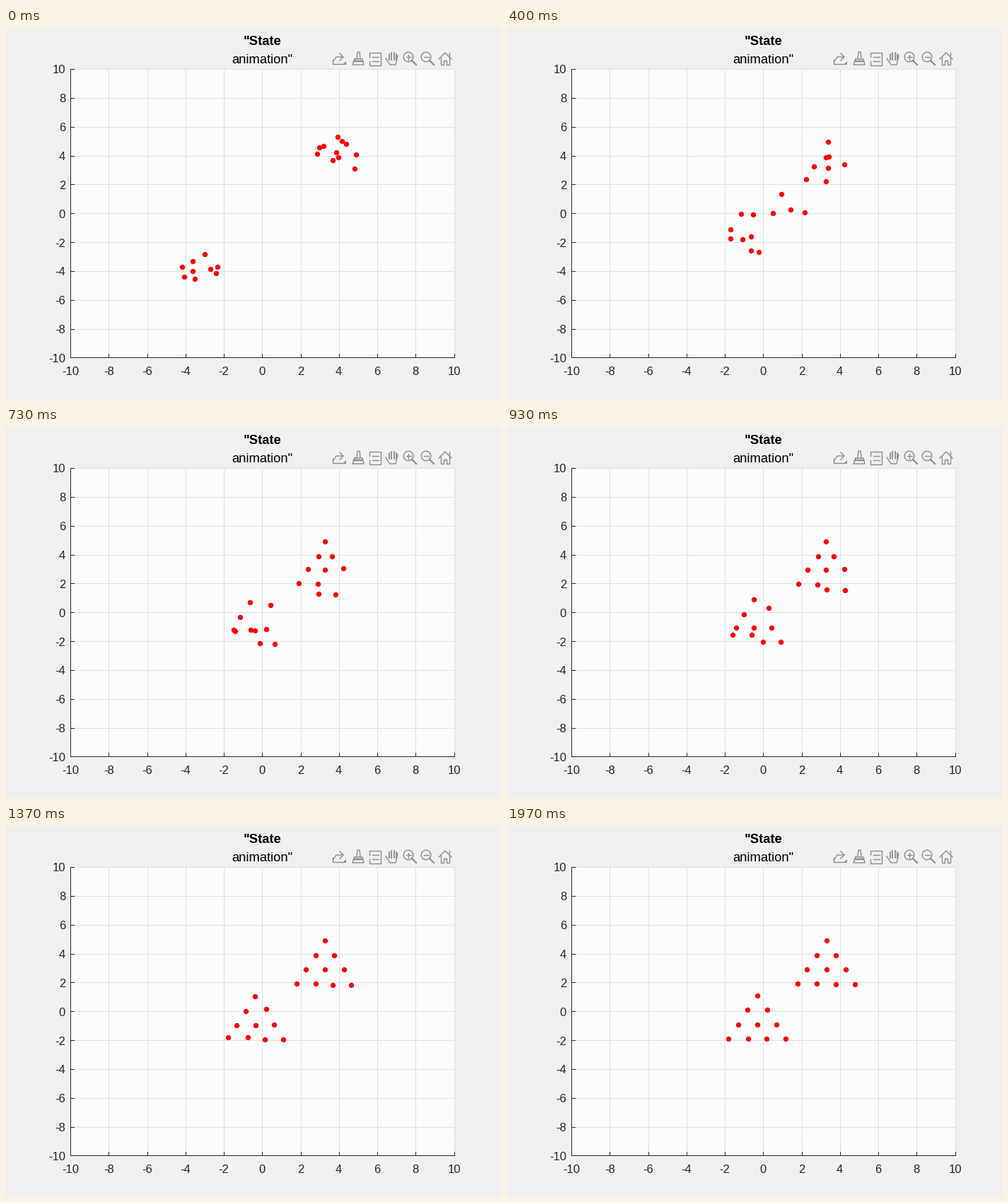
Write a matplotlib script that moves like this. It is 700 px wide and 525 px high and loops after 2.01 s.

```python
import numpy as np
import matplotlib.pyplot as plt
from matplotlib.animation import FuncAnimation
from matplotlib.patches import Circle, Polygon, Rectangle

W, H, DPI = 700, 525, 100
PX = 72 / DPI
BACK, PLOT, INK = "#f0f0f0", "#fcfcfd", "#262626"
GRID, ICON, RED = "#e0e0e0", "#8c8c8c", "#fa0000"
LEFT, RIGHT, TOP, BOTTOM = 91, 633.5, 58, 466.4

plt.rcParams["font.family"] = "Liberation Sans"
fig = plt.figure(figsize=(W / DPI, H / DPI), dpi=DPI, facecolor=BACK)
ax = fig.add_axes([0, 0, 1, 1])
ax.set_xlim(0, W)
ax.set_ylim(H, 0)
ax.axis("off")


def to_px(x, y):
    return (LEFT + (x + 10) * (RIGHT - LEFT) / 20,
            TOP + (10 - y) * (BOTTOM - TOP) / 20)


def line(xs, ys, color, width=1):
    ax.plot(xs, ys, color=color, lw=width * PX, solid_joinstyle="round")


def icon(*pts, width=1.4):
    line(*zip(*pts), ICON, width)


def label(x, y, text, size=12, ha="center", color=INK, **kw):
    ax.text(x, y, text, fontsize=size, ha=ha, va="baseline", color=color, **kw)


def draw_plot():
    ax.add_patch(Rectangle((LEFT, TOP), RIGHT - LEFT, BOTTOM - TOP,
                           fc=PLOT, ec="none"))
    values = range(-10, 11, 2)
    for v in values:
        x, y = to_px(v, v)
        line([x, x], [TOP, BOTTOM], GRID)
        line([LEFT, RIGHT], [y, y], GRID)
    for v in values:
        x, y = to_px(v, v)
        line([x, x], [BOTTOM, BOTTOM - 5], INK)
        line([LEFT, LEFT + 5], [y, y], INK)
        label(x, 491, str(v))
        label(84, y + 6.5, str(v), ha="right")
    line([LEFT, LEFT, RIGHT], [TOP, BOTTOM, BOTTOM], INK)
    label(362.5, 24, '"State', 13.2, color="black", weight="bold")
    label(362.5, 50, 'animation"', 13.2, color="black")


def export(x):
    icon((x - 9, 45), (x - 9, 51), (x + 5, 51))
    icon((x - 8, 47), (x - 4, 41), (x + 5, 41))
    icon((x + 1, 36), (x + 6, 41), (x + 1, 46))
    ax.add_patch(Polygon([(x + 5, 52), (x + 10, 52), (x + 10, 47)], fc=ICON))


def brush(x):
    icon((x - 2, 43), (x - 1, 34), (x + 2, 34), (x + 3, 43))
    icon((x - 5, 44), (x + 6, 44), (x + 8, 52), (x - 8, 52), (x - 5, 44))
    icon((x - 6, 47), (x + 6, 47), width=2.4)


def data_tip(x):
    for side in (-1, 1):
        icon((x - 8, 43.5 + side * 3), (x - 8, 43.5 + side * 9),
             (x + 8, 43.5 + side * 9), (x + 8, 43.5))
        icon((x - 4, 43.5 + side * 3), (x + 5, 43.5 + side * 3))


def hand(x):
    for i in range(4):
        fx = x - 4.5 + 3.5 * i
        icon((fx, 37 - 2 * (i in (1, 2))), (fx, 45), width=1.8)
    icon((x - 9, 43), (x - 3, 52), (x + 5, 52), (x + 8, 39))


def magnifier(x, plus):
    ax.add_patch(Circle((x - 2, 41), 6.8, fc="none", ec=ICON, lw=1.4 * PX))
    icon((x + 3, 46), (x + 9, 52), width=2.2)
    icon((x - 5.5, 41), (x + 1.5, 41))
    if plus:
        icon((x - 2, 37.5), (x - 2, 44.5))


def home(x):
    icon((x - 9, 44), (x, 35), (x + 9, 44))
    for side in (-1, 1):
        icon((x + side * 6, 42), (x + side * 6, 52),
             (x + side * 2, 52), (x + side * 2, 46), (x, 46))
    icon((x + 6, 35), (x + 6, 39))


def draw_toolbar():
    export(471)
    brush(498)
    data_tip(522)
    hand(546)
    magnifier(571, True)
    magnifier(596, False)
    home(621)


def triangle(x, y):
    """Ten slots in four rows below an apex."""
    return [to_px(x - r / 2 + c, y - r) for r in range(4) for c in range(r + 1)]


# Where the agents of each team start, in slot order.
STARTS = np.array([
    [(469, 154), (495, 179), (440, 178), (467, 176), (470, 183),
     (481, 164), (462, 187), (493, 199), (249, 338), (252, 352)],
    [(281, 320), (264, 344), (449, 167), (299, 338), (289, 341),
     (264, 330), (443, 169), (475, 160), (297, 347), (267, 355)],
])
goals = np.array([triangle(3.3, 4.9), triangle(-0.3, 1.1)])
errors = STARTS - goals
drift = errors.mean(axis=1, keepdims=True)


def positions(k):
    """Consensus: a team's shared error fades slower than its inner spread."""
    error = drift * np.exp(-0.075 * k) + (errors - drift) * np.exp(-0.105 * k)
    return (goals + error).reshape(-1, 2)


draw_plot()
draw_toolbar()
dots = ax.scatter(*positions(0).T, s=(7.4 * PX) ** 2, c=RED,
                  linewidths=0, zorder=5)


def update(i):
    # 30 steps a second, held on a 10 ms clock
    dots.set_offsets(positions((10 * i + 5) * 3 // 100))
    return dots,


anim = FuncAnimation(fig, update, frames=201, interval=10, repeat=True,
                     repeat_delay=0, blit=False)
plt.show()
```
